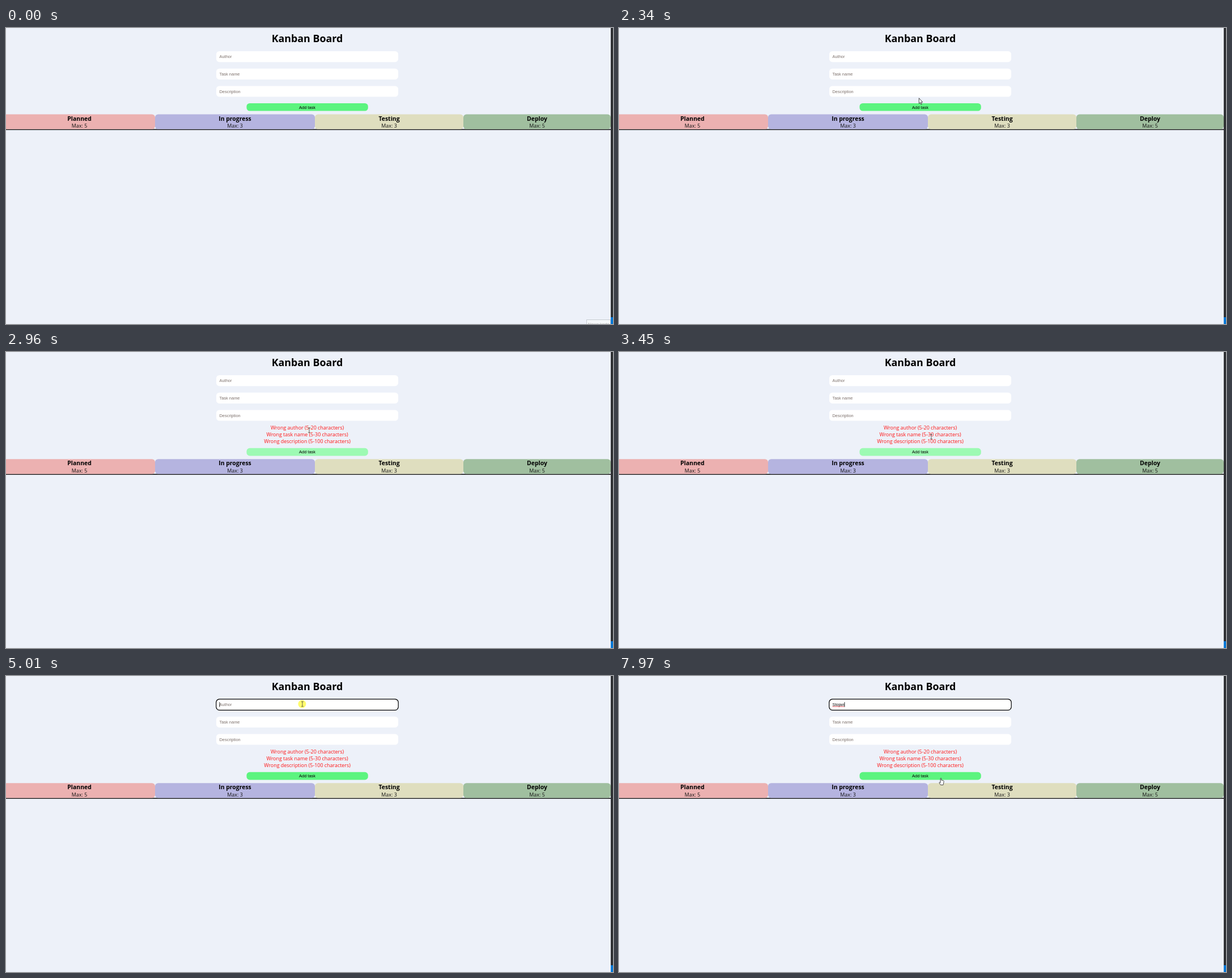
These frames come from a looping animation (1071x523 px, 8000 ms). An HTML page with a canvas:

```html
<!DOCTYPE html>
<html lang="en">
<head>
<meta charset="utf-8">
<title>Kanban Board</title>
<style>
html, body { margin: 0; width: 100%; height: 100%; overflow: hidden; background: #edf1f9; }
canvas { display: block; width: 100vw; height: 100vh; }
</style>
</head>
<body>
<canvas id="stage" width="1071" height="523"></canvas>
<script>
const ctx = document.getElementById('stage').getContext('2d');
const LOOP = 8000, STEP = 70;
const OPEN = '"Open Sans", sans-serif';
const ARIAL = '"Liberation Sans", Arial, sans-serif';
const BODY = `8.925px ${OPEN}`, SMALL = `7.44px ${ARIAL}`;
const CENTER = 531.5, SHIFT = 36.8, RADIUS = 5.5;

// Moments of the story, in ms
const PRESS = 2830, SUBMIT = 2960, FOCUS = 5010, TYPE = 5740, TYPED = 6550;
const SUGGEST = 6610, DISMISS = 7490;

const NAME = 'Stojan';
const FIELDS = ['Author', 'Task name', 'Description'];
const ERRORS = ['author (5-20', 'task name (5-30', 'description (5-100'];
const COLUMNS = [
  { title: 'Planned', max: 5, left: -4, right: 263, color: '#ecb1b1' },
  { title: 'In progress', max: 3, left: 263, right: 545, color: '#b5b4e0' },
  { title: 'Testing', max: 3, left: 545, right: 807, color: '#dfdebf' },
  { title: 'Deploy', max: 5, left: 807, right: 1067, color: '#a0bf9f' }
];

// Where the pointer turns: time, x, y
const STOPS = [
  [330, 984, 511], [890, 405, 99], [1990, 450, 50], [2340, 529, 123.5],
  [PRESS, 535, 138], [SUBMIT, 535, 138], [3310, 552, 176], [3450, 551, 149.5],
  [3930, 523, 49], [7420, 522.5, 51], [7830, 595, 166], [7970, 568, 180]
];

const POINTERS = {
  arrow: new Path2D('M.3 .3v9.8l2.1-1.9 1.5 3.4 1.4-.6-1.4-3.4h2.9z'),
  beam: new Path2D('M-2-4h4m-2 0v8.3m-2 0h4'),
  hand: new Path2D('M-.8 8V1q.8-1.6 1.6 0v3l3.8 1q.8.3 .6 1.5l-1.2 6h-4.6l-2.4-4q-.2-1.8 2.2 0z')
};
const NOTCH = new Path2D('M432.5 66l5.5-5.5 5.5 5.5z');

const clamp = v => Math.min(1, Math.max(0, v));
const ease = p => p * p * (3 - 2 * p);
const between = (v, lo, hi) => v >= lo && v < hi;
const fieldTop = i => 41 + 30.7 * i;
const shiftAt = t => t >= SUBMIT ? SHIFT : 0;

function pointerAt(t) {
  const next = STOPS.findIndex(s => s[0] > t);
  if (next < 0) return STOPS[STOPS.length - 1].slice(1);
  const [t0, x0, y0] = STOPS[next - 1], [t1, x1, y1] = STOPS[next];
  const p = ease(Math.floor((t - t0) / STEP) * STEP / (t1 - t0));
  return [x0 + (x1 - x0) * p, y0 + (y1 - y0) * p];
}

function text(str, x, y, font, color, align = 'left') {
  ctx.font = font;
  ctx.fillStyle = color;
  ctx.textAlign = align;
  ctx.fillText(str, x, y);
}

function rect(x, y, w, h, color) {
  ctx.fillStyle = color;
  ctx.fillRect(x, y, w, h);
}

function box(x, y, w, h, color, r = RADIUS) {
  ctx.fillStyle = color;
  ctx.beginPath();
  ctx.roundRect(x, y, w, h, r);
  ctx.fill();
}

function drawForm(t) {
  text('Kanban Board', CENTER, 24.6, `bold 17.85px ${OPEN}`, '#000', 'center');
  const count = t < TYPE ? 0 : 1 + Math.floor(clamp((t - TYPE) / (TYPED - TYPE)) * (NAME.length - 1));
  const typed = NAME.slice(0, count);

  FIELDS.forEach((label, i) => {
    const y = fieldTop(i);
    const focused = i === 0 && t >= FOCUS;
    if (focused) box(370.2, y - 0.8, 322.6, 20.7, '#000', RADIUS + 0.8);
    const inset = focused ? 0.4 : 0;
    box(371 + inset, y + inset, 321 - 2 * inset, 19.2 - 2 * inset, '#fff');
    const value = focused && typed;
    text(value || label, 376.5, y + 12.2, SMALL, value ? '#111' : '#7c706b');
  });

  const caret = between(t, FOCUS, 5610) || between(t, TYPE, 7220) || t >= 7690;
  if (caret) {
    ctx.font = SMALL;
    rect(376.4 + ctx.measureText(typed).width, 46.2, 0.9, 8.6, '#111');
  }
  if (t >= DISMISS + STEP) rect(376.5, 53.6, 21, 0.8, '#e5343c');
}

function drawButton(t, dy) {
  const hover = clamp((t - 2410) / 140) - clamp((t - 3450) / 140);
  const mix = (a, b) => Math.round(a + (b - a) * hover);
  box(424.5, 133 + dy, 214.3, 13.6, `rgb(${mix(92, 157)},${mix(244, 250)},${mix(127, 179)})`);
  text('Add task', CENTER, 142.5 + dy, SMALL, '#000', 'center');
}

function drawBoard(dy) {
  rect(0, 178.6 + dy, 1067, 1.6, '#111');
  for (const { title, max, left, right, color } of COLUMNS) {
    const mid = (left + right) / 2;
    box(left, 152.4 + dy, right - left, 26.4, color);
    text(title, mid, 163.6 + dy, `bold 10.44px ${OPEN}`, '#000', 'center');
    text('Max: ' + max, mid, 175.9 + dy, BODY, '#111', 'center');
  }
}

function drawErrors() {
  ERRORS.forEach((e, i) =>
    text(`Wrong ${e} characters)`, CENTER, 136.8 + i * 12.27, BODY, '#ff1414', 'center'));
}

function drawPopup() {
  ctx.save();
  ctx.shadowColor = 'rgba(0,0,0,.3)';
  ctx.shadowBlur = 2;
  box(426, 65.3, 40, 24.5, '#292a2d', 2);
  ctx.restore();
  ctx.fillStyle = '#292a2d';
  ctx.fill(NOTCH);
  text(NAME, 433, 80.4, SMALL, '#e8eaed');
}

function drawEdge(t) {
  rect(1067, 0, 4, 523, '#2f3134');
  rect(1067, 511, 4, 12, '#0078d7');
  if (t < STEP) {
    rect(1024, 515, 43, 8, '#c6ccd2');
    rect(1025, 516, 41, 7, '#f5f8fa');
    text('Nowa karta', 1027, 525.5, SMALL, '#aaa');
  }
}

function pointerKind(x, y, t) {
  const dy = shiftAt(t);
  if (between(x, 424, 639) && between(y, 133 + dy, 147 + dy)) return 'hand';
  const onField = between(x, 371, 692) && FIELDS.some((f, i) => between(y - fieldTop(i), 0, 19.5));
  const onError = dy && between(x, 455, 608) && between(y, 127.5, 164.5);
  return onField || onError ? 'beam' : 'arrow';
}

function drawPointer(t) {
  if (t < STOPS[0][0]) return;
  const [x, y] = pointerAt(t);
  const kind = pointerKind(x, y, t);
  ctx.save();
  ctx.translate(x, y);
  for (const click of [PRESS, FOCUS]) {
    const age = (t - click) / (2 * STEP);
    if (between(age, 0, 1)) box(-7.5, -7, 14, 14, `rgba(255,250,70,${0.8 * (1 - age)})`, 7);
  }
  ctx.lineWidth = 0.8;
  ctx.lineJoin = 'round';
  ctx.fillStyle = '#fff';
  ctx.strokeStyle = kind === 'beam' ? '#444' : '#222';
  ctx.fill(POINTERS[kind]);
  ctx.stroke(POINTERS[kind]);
  ctx.restore();
}

function draw(t) {
  const dy = shiftAt(t);
  rect(0, 0, 1071, 523, '#edf1f9');
  drawForm(t);
  if (dy) drawErrors();
  drawButton(t, dy);
  drawBoard(dy);
  if (between(t, SUGGEST, DISMISS)) drawPopup();
  drawEdge(t);
  drawPointer(t);
}

const start = performance.now();
function tick() {
  draw((performance.now() - start) % LOOP);
  requestAnimationFrame(tick);
}
tick();
</script>
</body>
</html>
```
